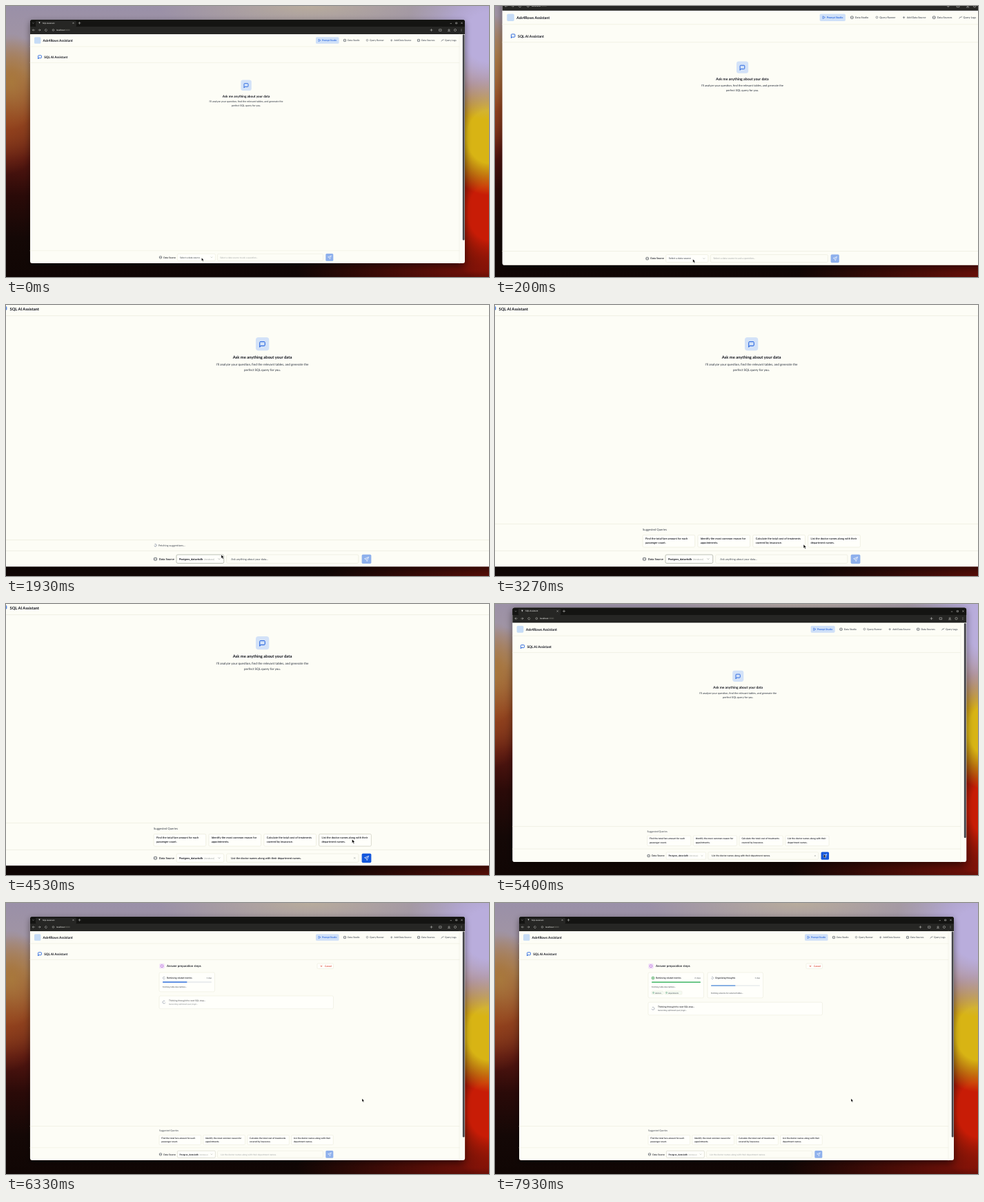
Recreate the animation shown at these times as an HTML page. Size 700 by 394 pixels, loop 8000 ms.

```html
<!DOCTYPE html>
<html lang="en">
<head>
<meta charset="utf-8">
<title>SQL Assistant</title>
<style>
html, body { margin: 0; width: 100%; height: 100%; overflow: hidden; background: #140c04; }
#stage { position: relative; width: 100%; height: 100%; overflow: clip; contain: strict; }
#wall, svg { position: absolute; left: 0; top: 0; width: 700px; height: 394px; }
#wall {
  transform-origin: 0 0;
  background:
    radial-gradient(45px 70px at 8px 110px, #a8783c, #a8783c00),
    radial-gradient(60px 80px at 0 165px, #94421c, #94421c00),
    radial-gradient(220px 45px at 440px 0, #b8ac9c, #b8ac9c00),
    radial-gradient(120px 120px at 700px 45px, #b9addc 30%, #b9addc00),
    radial-gradient(70px 85px at 700px 190px, #d8b414 45%, #d8b41400),
    radial-gradient(75px 100px at 700px 300px, #c81c06 40%, #c81c0600),
    radial-gradient(260px 50px at 680px 385px, #701008, #70100800),
    linear-gradient(#9a90a8, #a094a4 12%, #a87c58 26%, #8c4422 42%, #561610 56%, #2a0a08 70%, #140806 86%, #100604);
}
svg { font-family: Lato, "Open Sans", sans-serif; text-rendering: geometricPrecision; }
</style>
</head>
<body>
<div id="stage">
  <div id="wall"></div>
  <svg viewBox="0 0 700 394"><g id="world"></g></svg>
</div>
<script>
const LOOP = 8000;
const PAGE = '#fdfdf6', CARD = '#fffffb', LINE = '#ebebdc', INK = '#10121c', SOFT = '#444a54', FAINT = '#a0a4a4', BLUE = '#1558dc';
const DB = 'Postgres_datavisdb', PROMPT = 'List the doctor names along with their department names.';
const $ = id => document.getElementById(id);

// Markup helpers
const text = (x, y, size, str, fill = INK, weight = 400, anchor = 'start') =>
  `<text x="${x}" y="${y}" font-size="${size}" fill="${fill}" font-weight="${weight}" text-anchor="${anchor}">${str}</text>`;
const box = (x, y, w, h, fill = 'none', stroke = 'none', r = 1.5, extra = '') =>
  `<rect x="${x}" y="${y}" width="${w}" height="${h}" rx="${r}" fill="${fill}" stroke="${stroke}" stroke-width=".6" ${extra}/>`;
const path = (d, stroke = INK, width = .5, fill = 'none') =>
  `<path d="${d}" stroke="${stroke}" stroke-width="${width}" fill="${fill}" stroke-linejoin="round" stroke-linecap="round"/>`;
const ring = (x, y, r, stroke = SOFT) => `<circle cx="${x}" cy="${y}" r="${r}" fill="none" stroke="${stroke}" stroke-width=".5"/>`;
const rule = y => path(`M35 ${y}h622`, LINE, .6);
const group = (id, body) => `<g id="${id}">${body}</g>`;
const bubble = (x, y, s) => path(`M${x} ${y + s}v${-s * .85}q0 -${s * .15} ${s * .15} -${s * .15}h${s * .7}q${s * .15} 0 ${s * .15} ${s * .15}v${s * .5}q0 ${s * .15} -${s * .15} ${s * .15}h-${s * .65}z`, BLUE, .8);
const cross = (x, y, r, color) => path(`M${x - r} ${y - r}l${2 * r} ${2 * r}m0 ${-2 * r}l${-2 * r} ${2 * r}`, color);
const spinner = (x, y, r) => `<g class="spin" data-at="${x} ${y}">${path(`M${x} ${y - r}a${r} ${r} 0 1 1 ${-r} ${r}`, '#8890a4', .6)}</g>`;
const chevron = (x, y) => path(`M${x - 1} ${y - .5}l1 1l1 -1`, FAINT);
const dbIcon = (x, y) => box(x - 1.6, y - 1.6, 3.2, 3.2, 'none', SOFT, .7) + path(`M${x - 1.6} ${y}h3.2`, SOFT, .4);

const browser = () => `
  ${box(35, 20, 630, 354, PAGE, 'none', 3, 'filter="url(#shadow)"')}
  ${path('M35 41V23q0 -3 3 -3H662q3 0 3 3V41z', 'none', 0, '#262624')}
  ${path('M35 30V23q0 -3 3 -3H662q3 0 3 3V30z', 'none', 0, '#141412')}
  ${box(43, 21.5, 59, 8.5, '#262624')}
  ${chevron(39.5, 25)}${path('M47.5 23.2h2l-1 2.6z', 'none', 0, '#e0e0e0')}
  ${text(53, 25.8, 2.9, 'SQL Assistant', '#eeeeec', 500)}
  ${cross(97.5, 24.8, .7, '#d4d4d0')}${path('M105 24.8h3m-1.5 -1.5v3', '#d4d4d0')}
  ${path('M644 25.4h1.6M652 24h1.8v1.8h-1.8z', '#d4d4d0')}${cross(660.5, 24.8, .8, '#e4e4e0')}
  ${path('M41.5 35h-3l1.2 -1.2m-1.2 1.2l1.2 1.2M47 35h3l-1.2 -1.2m1.2 1.2l-1.2 1.2M59.3 34.4a1.5 1.5 0 1 0 .1 1.2', '#d0d0cc')}
  ${ring(68.5, 35, 1.3, '#d0d0cc')}
  ${text(73, 36, 3, 'localhost<tspan fill="#80807a">:3000</tspan>', '#f4f4f0', 500)}
  ${path('M615 35h3m-1.5 -1.5v3M628 33.8h3v2.6h-3zM642 33.4v2m-1.2 -1l1.2 1.2l1.2 -1.2m-2.8 2.2h3.2', '#d4d4d0')}
  ${ring(651, 35, 1.6, '#d0d0cc')}
  ${path('M660 33.8v.01m0 1.2v.01m0 1.2v.01', '#d4d4d0', .6)}
  ${path('M657 41V374', LINE, .5)}${box(661.8, 41.5, 2.8, 299, '#44444a', 'none', 1)}`;

const navIcons = [x => dbIcon(x - 4, 50), x => ring(x - 3.5, 49.8, 1.3), x => path(`M${x - 5} 50h2.4m-1.2 -1.2v2.4`, SOFT),
  x => dbIcon(x - 4, 50), x => path(`M${x - 5} 51.2l1.2 -2l1 1l1 -1.6`, SOFT)];
const nav = () => box(449, 45.3, 33.5, 9.4, '#cfe0f8') + path('M453 48.6v3l2.7 -1.5z', BLUE) +
  text(458, 51.2, 3.35, 'Prompt Studio', BLUE, 600) +
  [[495, 'Data Studio'], [527, 'Query Runner'], [562.5, 'Add Data Source'], [602, 'Data Sources'], [636, 'Query Logs']]
    .map(([x, label], i) => navIcons[i](x) + text(x, 51.2, 3.35, label, SOFT, 600)).join('');

const header = () => `
  ${box(41, 45.3, 9.4, 9.4, '#c6dcf6')}
  ${text(53.5, 52, 4.85, 'Ask4Rows Assistant', INK, 700)}
  ${nav()}${rule(59)}
  ${bubble(46.6, 71.8, 4.8)}${text(55.2, 76, 4.65, 'SQL AI Assistant', INK, 700)}${rule(82.4)}`;

const hero = () => `
  ${box(340.4, 107.5, 15.4, 15.4, '#d3e2f8', 'none', 3)}${bubble(345, 112.6, 6)}
  ${text(348, 132.6, 4.7, 'Ask me anything about your data', INK, 700, 'middle')}
  ${text(348, 140.3, 3.65, "I'll analyze your question, find the relevant tables, and generate the", SOFT, 600, 'middle')}
  ${text(348, 146.4, 3.65, 'perfect SQL query for you.', SOFT, 600, 'middle')}`;

const cards = [
  ['Find the total fare amount for each', 'passenger count.'],
  ['Identify the most common reason for', 'appointments.'],
  ['Calculate the total cost of treatments', 'covered by insurance.'],
  ['List the doctor names along with their', 'department names.']];

const suggestions = () => rule(324.5) + text(222, 332.4, 3.4, 'Suggested Queries', SOFT, 500) +
  cards.map((lines, i) => {
    const x = 222 + i * 63.9;
    return box(x, 337.4, 60.6, 14.2, CARD, LINE, 1.5, i == 3 ? 'id="pick"' : '') +
      lines.map((line, n) => text(x + 3.2, 342.7 + n * 4.9, 3.2, line, INK, 600)).join('');
  }).join('');

const dbLabel = y => text(251.5, y, 3.2, DB, INK, 700) + text(280.3, y, 2.8, '(database)', FAINT);

const composer = () => `
  ${rule(355.8)}${dbIcon(224, 365.4)}${text(228.2, 366.5, 3.3, 'Data Source', INK, 600)}
  ${box(248.4, 360.3, 55, 10, CARD, LINE, 1.5, 'id="select"')}${chevron(298, 365.4)}
  ${group('unset', text(252, 366.5, 3.3, 'Select a data source', SOFT, 500) + text(310.2, 366.5, 3.2, 'Select a data source to ask a question...', FAINT))}
  ${group('chosen', dbLabel(366.5))}
  ${box(306.5, 360.3, 153, 10, 'none', LINE)}
  ${group('hint', text(311.8, 366.5, 3.2, 'Ask anything about your data...', SOFT))}
  ${group('typed', text(311.8, 366.5, 3.2, PROMPT, INK, 600) + cross(455, 365.4, .7, FAINT))}
  ${group('sent', text(311.2, 366.5, 3.2, PROMPT, FAINT))}
  ${box(463.3, 360, 11, 10.8, BLUE, 'none', 1.5, 'id="send"')}
  ${path('M471 363.2l-4.6 1.7l2 .8l.9 2.1zl-2.6 2.5', '#fff', .5)}
  ${group('menu', box(248.6, 350.4, 54.4, 9.4, '#f4f4ea', LINE) + dbLabel(356.2))}
  ${group('fetching', rule(343.2) + spinner(224, 349.4, 1.4) + text(227.5, 350.6, 3.15, 'Fetching suggestions...', SOFT))}`;

const chip = (x, w, label) => box(x, 128, w, 5, '#f4faf2', LINE) + ring(x + 2.6, 130.5, .9, '#2f8a5a') +
  text(x + 5, 131.5, 2.7, label, SOFT, 500);

const answer = () => `
  ${box(222.3, 88, 7.4, 7.4, '#f0def8')}<circle cx="226" cy="91.7" r="1.8" fill="none" stroke="#9c38c8" stroke-width=".8" stroke-dasharray=".9 .5"/>
  ${text(233, 93.2, 4.4, 'Answer preparation steps', INK, 600)}
  ${box(451, 88, 23.5, 7.6, CARD, LINE)}${cross(457, 91.8, .9, '#d82c1c')}${text(462, 92.9, 3.3, 'Cancel', '#d82c1c', 600)}
  ${box(222, 101, 80.5, 28, CARD, LINE, 2, 'id="card"')}
  ${group('busy', spinner(229, 109, 1.5) + text(298, 109.8, 2.8, '1 step', SOFT, 400, 'end'))}
  ${text(233, 110.2, 3.25, 'Retrieving related metrics', INK, 600)}
  ${box(227, 114.4, 71, 1.3, '#e4e8ea', 'none', .6)}${box(227, 114.4, 0, 1.3, BLUE, 'none', .6, 'id="bar"')}
  ${text(227, 122.8, 2.8, 'Fetching table descriptions...', SOFT, 500)}
  ${group('second', box(227.3, 107.4, 3.4, 3.4, '#b4dcb8', '#2f9a4c', .8) +
    text(298, 109.8, 2.8, '2 steps', SOFT, 400, 'end') + chip(227, 17, 'doctors') + chip(246, 25, 'departments') +
    box(308, 101, 80.5, 37, CARD, LINE, 2) + spinner(315, 109, 1.5) +
    text(319, 110.2, 3.25, 'Organising thoughts', INK, 600) + text(384, 109.8, 2.8, '1 step', SOFT, 400, 'end') +
    box(313, 119.4, 71, 1.3, '#e4e8ea', 'none', .6) + box(313, 119.4, 0, 1.3, '#4c8cdc', 'none', .6, 'id="bar2"') +
    text(313, 131.8, 2.8, 'Fetching columns for selected tables...', SOFT, 500))}
  ${group('thinking', box(222, 135, 252.5, 18.8, CARD, LINE, 2) + spinner(229, 144.2, 2) +
    group('pulse', text(236, 143.3, 3.25, 'Thinking through the next SQL step...', INK, 600) + text(236, 147.8, 2.75, 'Generating optimized query logic...', SOFT, 500)))}`;

$('world').innerHTML = `
  <filter id="shadow" x="-10%" y="-10%" width="120%" height="125%"><feDropShadow dx="0" dy="3" stdDeviation="5" flood-opacity=".45"/></filter>
  ${browser()}${header()}${group('hero', hero())}${group('answer', answer())}
  ${group('suggestions', suggestions())}${composer()}
  ${group('cursor', path('M0 0v4.2l1 -.9l.8 1.7l.8 -.4l-.8 -1.6h1.3z', '#fff', .3, '#000'))}`;

// Moments of the session, in ms
const OPEN = 330, CHOOSE = 1330, READY = 2330, HOVER = 3330, FILL = 4000, ZOOM_OUT = 4980, SEND = 5600, STEP2 = 7130;
// Cursor stops: time, x, y
const route = [[450, 283.5, 366.3], [620, 283.4, 360], [1000, 283.4, 360], [1400, 300.4, 360.4], [2670, 300.4, 360.4],
  [3600, 452, 343.6], [4600, 452, 343.6], [5200, 467, 363.4], [5650, 467, 363.4], [6200, 516, 284.6]];

const clamp = v => Math.max(0, Math.min(1, v));
const smooth = v => (v = clamp(v)) * v * (3 - 2 * v);
const spring = ms => { const v = Math.max(0, ms) * .0075; return 1 - (1 + v) * Math.exp(-v); };
const show = (id, on) => $(id).style.display = on ? '' : 'none';
const spinners = document.querySelectorAll('.spin');

function cursorAt(t) {
  let i = route.findIndex(p => p[0] > t);
  if (i < 0) i = route.length;
  const a = route[Math.max(0, i - 1)], b = route[Math.min(route.length - 1, i)];
  const k = smooth((t - a[0]) / (b[0] - a[0] || 1));
  return [a[1] + (b[1] - a[1]) * k, a[2] + (b[2] - a[2]) * k];
}

function draw(t) {
  const zoom = .25 * (spring(t) - spring(t - ZOOM_OUT));
  const cam = `matrix(${[1 + zoom, 0, 0, 1 + zoom, -254 * zoom, -349.5 * zoom]})`;
  $('world').setAttribute('transform', cam);
  $('wall').style.transform = cam;

  const chosen = t >= CHOOSE, filled = t >= FILL, sent = t >= SEND, second = t >= STEP2;
  show('menu', t >= OPEN && !chosen);
  show('unset', !chosen);
  show('chosen', chosen);
  show('fetching', chosen && t < READY);
  show('suggestions', t >= READY);
  show('hint', chosen && !filled);
  show('typed', filled && !sent);
  show('sent', sent);
  show('hero', !sent);
  show('answer', sent);
  show('second', second);
  show('busy', !second);

  $('select').setAttribute('stroke', chosen && !filled ? '#a8aca0' : sent ? '#d0d0c4' : LINE);
  $('pick').setAttribute('stroke', t >= HOVER && t < 4800 ? '#ccccbe' : LINE);
  $('send').setAttribute('fill', filled && !sent ? BLUE : '#8eb0ec');
  $('card').setAttribute('height', second ? 37 : 28);
  $('thinking').setAttribute('transform', `translate(0 ${second ? 9.2 : 0})`);
  $('pulse').style.opacity = .75 + .25 * Math.cos((t - 7700) * Math.PI / 1000);
  $('bar').setAttribute('fill', second ? '#22b04c' : '#3474e0');
  $('bar').setAttribute('width', 35.5 * (smooth((t - SEND) / 400) + smooth((t - STEP2) / 300)));
  $('bar2').setAttribute('width', 35.5 * smooth((t - STEP2) / 400));
  for (const s of spinners) s.setAttribute('transform', `rotate(${t * .36} ${s.dataset.at})`);
  $('cursor').setAttribute('transform', `translate(${cursorAt(t)})`);
}

const start = performance.now();
(function tick() {
  draw((performance.now() - start) % LOOP);
  requestAnimationFrame(tick);
})();
</script>
</body>
</html>
```
